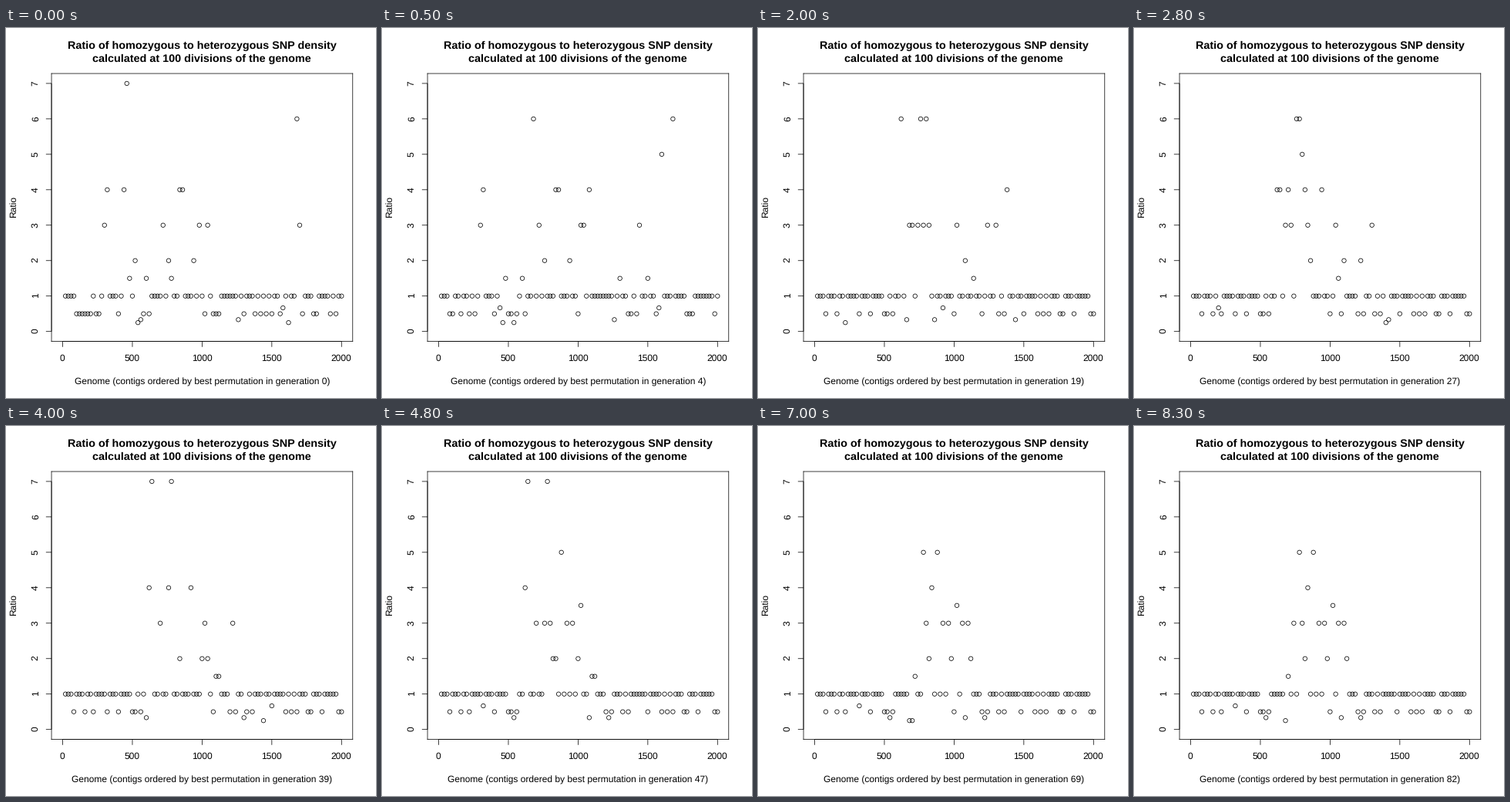
Animation of 480 by 480 pixels, one loop 8400 ms. Source, as a matplotlib script:

```python
import random

import matplotlib.pyplot as plt
import numpy as np
from matplotlib.animation import FuncAnimation

SIZE, DPI = 480, 72
FRAMES, STEP_MS = 84, 100
LEFT, RIGHT, TOP, BOTTOM = 59.04, 449.76, 59.04, 406.56
LINE = 0.75

# divisions that keep a low ratio once the first order is broken up
DIPS = [4, 8, 11, 16, 20, 25, 26, 28, 50, 54, 60, 62,
        66, 68, 75, 80, 82, 84, 88, 89, 93, 99, 100]

# (first frame, last frame of the change, hill limits, highest points)
STAGES = [
    (0, 11, (30, 81), {3: [31, 51, 72], 4: [54], 5: [46, 47, 80],
                       6: [34], 7: [79]}),
    (11, 20, (31, 65), {3: [34, 35, 37, 39, 41, 51, 62, 65], 4: [69],
                        6: [31, 38, 40]}),
    (20, 28, (31, 65), {3: [34, 36, 42, 52, 65], 4: [31, 32, 35, 41, 47],
                        5: [40], 6: [38, 39]}),
    (28, 40, (30, 61), {3: [35, 51, 61], 4: [31, 38, 46], 7: [32, 39]}),
    (40, 58, (36, 58), {3: [38, 40, 46, 48, 53, 55], 3.5: [51], 4: [42],
                        5: [39, 44]}),
]

plt.rcParams.update({
    "font.family": "Liberation Sans",
    "font.size": 12,
    "text.hinting": "none",
})
rng = random.Random(7)


def landscape(dips, hill, peaks):
    """Ratios of the 100 divisions: a flat base, low dips, a rough hill."""
    vals = np.ones(101)
    vals[dips] = 0.5
    for ratio, count in ((1 / 4, 2), (1 / 3, 3), (2 / 3, 1)):
        vals[rng.sample(range(10, 85), count)] = ratio
    for ratio, count in ((1.5, 3), (2, 4)):
        vals[rng.sample(range(hill[0], hill[1] + 1), count)] = ratio
    for ratio, divisions in peaks.items():
        vals[divisions] = ratio
    return vals[1:]


def change(history, start, end, vals):
    """Let each division take its new ratio at its own moment."""
    for i, ratio in enumerate(vals):
        span = end - start
        if i < 26:  # the left flank settles sooner
            span = int(span * 0.67)
        history[start + rng.randint(1, span):, i] = ratio


def build_history():
    first = landscape(rng.sample(range(1, 101), 31), (21, 48),
                      {3: [15, 36, 49, 52, 85], 4: [16, 22, 42, 43],
                       6: [84], 7: [23]})
    history = np.tile(first, (FRAMES, 1))
    for start, end, hill, peaks in STAGES:
        change(history, start, end, landscape(DIPS, hill, peaks))

    # last, two short stretches of the genome slide by one division
    final = history[-1].copy()
    for part in (slice(31, 38), slice(72, 84)):
        final[part] = np.roll(final[part], -1)
    change(history, 63, 72, final)
    return history


def put(x, y, text, **style):
    """Text centred on x with its baseline at y, in pixels from top left."""
    return fig.text(x / SIZE, 1 - y / SIZE, text, ha="center", va="baseline",
                    rotation_mode="anchor", **style)


fig = plt.figure(figsize=(SIZE / DPI, SIZE / DPI), dpi=DPI, facecolor="white")
ax = fig.add_axes([LEFT / SIZE, 1 - BOTTOM / SIZE,
                   (RIGHT - LEFT) / SIZE, (BOTTOM - TOP) / SIZE])
ax.set(xlim=(-80, 2080), ylim=(-0.28, 7.28), xticks=[], yticks=[])
for spine in ax.spines.values():
    spine.set(linewidth=LINE, snap=False)


def stroke(xs, ys):
    """A thin black line in pixels from top left."""
    fig.add_artist(plt.Line2D(np.array(xs) / SIZE, 1 - np.array(ys) / SIZE,
                              color="black", lw=LINE, snap=False,
                              solid_capstyle="butt"))


def px(x):
    return LEFT + (x + 80) * (RIGHT - LEFT) / 2160


def py(y):
    return BOTTOM - (y + 0.28) * (BOTTOM - TOP) / 7.56


stroke([px(0), px(2000)], [BOTTOM, BOTTOM])
stroke([LEFT, LEFT], [py(0), py(7)])
for tick in range(0, 2001, 500):
    stroke([px(tick)] * 2, [BOTTOM, BOTTOM + 7.2])
    put(px(tick) - 0.3, 431.5, str(tick))
for tick in range(8):
    stroke([LEFT - 7.2, LEFT], [py(tick)] * 2)
    put(41.8, py(tick) - 0.6, str(tick), rotation=90)

mid_x, mid_y = (LEFT + RIGHT) / 2, (TOP + BOTTOM) / 2
put(mid_x - 0.4, 27, "Ratio of homozygous to heterozygous SNP density",
    size=14.4, weight="bold")
put(mid_x - 0.4, 44, "calculated at 100 divisions of the genome",
    size=14.4, weight="bold")
put(12.6, mid_y - 0.8, "Ratio", rotation=90)
caption = put(mid_x, 462.5, "")

positions = np.arange(20, 2001, 20)
history = build_history()
dots = ax.scatter(positions, history[0], s=5.4 ** 2, facecolors="none",
                  edgecolors="black", linewidths=LINE, zorder=3)


def draw(frame):
    generation = max(0, frame - 1)
    caption.set_text("Genome (contigs ordered by best permutation "
                     f"in generation {generation})")
    dots.set_offsets(np.column_stack([positions, history[frame]]))
    return dots, caption


anim = FuncAnimation(fig, draw, frames=FRAMES, interval=STEP_MS,
                     repeat=True, repeat_delay=0, blit=False)
plt.show()
```
